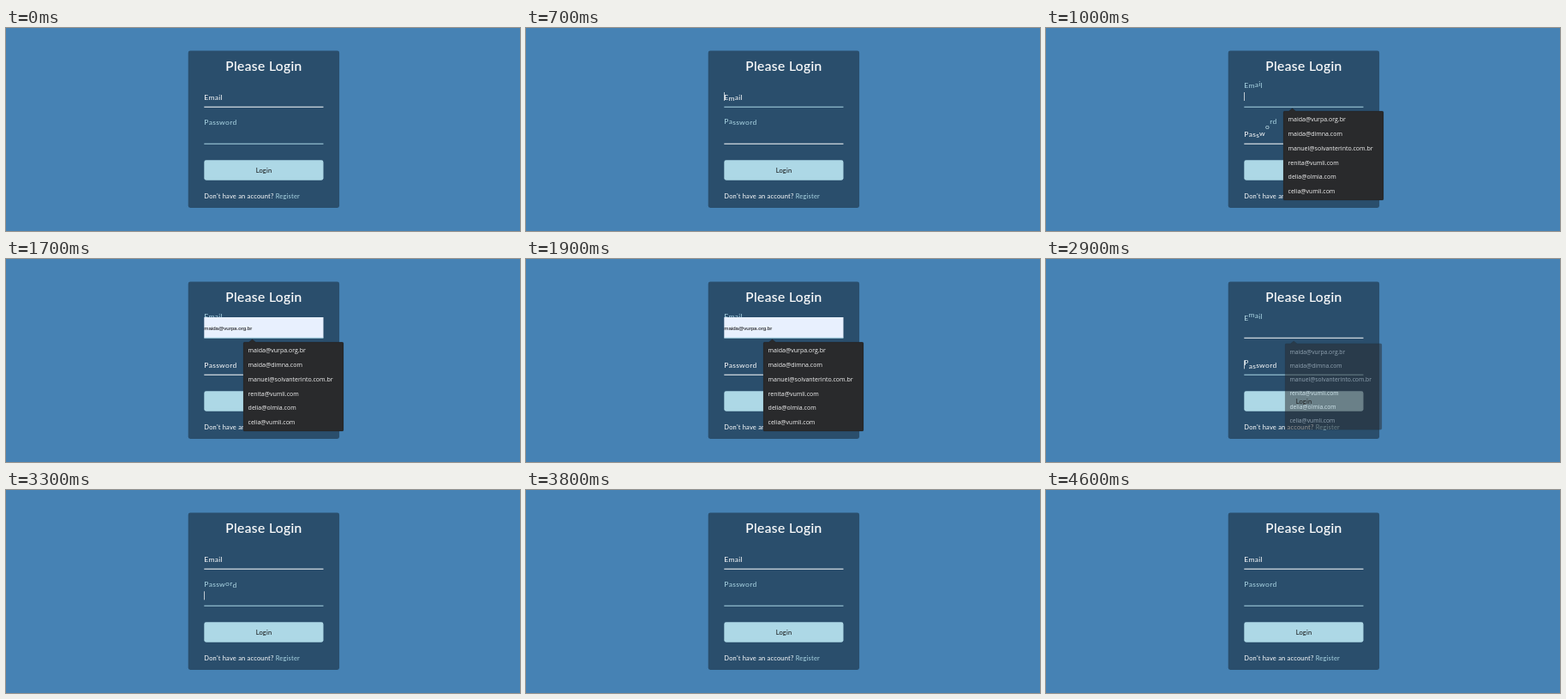
An HTML page for the animation above (5 s loop, 600 by 237 pixels).

```html
<!DOCTYPE html>
<html lang="en">
<head>
<meta charset="utf-8">
<title>Login form</title>
<style>
  html, body { margin: 0; width: 100%; height: 100%; overflow: hidden; background: #4682b4; }
  svg { display: block; width: 600px; height: 237px; font-family: Lato, "Open Sans", sans-serif; }
  text { fill: #fff; white-space: pre; }
  .title { font-size: 15.5px; letter-spacing: .42px; stroke: #fff; stroke-width: .2px; }
  .small { font-size: 7.5px; letter-spacing: .2px; }
  .label { font-size: 8.45px; letter-spacing: .3px; }
  .link { fill: #add8e6; }
  .fill { font: 6.13px "Liberation Sans", Arial, sans-serif; fill: #000; }
  #popup { transform-origin: 335.5px 149px; }
  #popup text { font: 7px "Open Sans", "Noto Sans", sans-serif; fill: #f4f4f4; }
</style>
</head>
<body>
<svg viewBox="0 0 600 237">
  <rect x="212.7" y="26.5" width="176.4" height="183.5" rx="2.4" fill="#000" fill-opacity=".4"/>
  <text class="title" x="301" y="50.3" text-anchor="middle">Please Login</text>

  <text class="label" id="email" x="231.3"></text>
  <text class="label" id="password" x="231.3"></text>
  <g id="preview">
    <rect x="231.3" y="68" width="139.2" height="24" fill="#e8f0fe"/>
    <text class="fill" x="231.3" y="82.5">maida@vurpa.org.br</text>
  </g>
  <rect id="emailLine" x="231.3" y="91.7" width="139.2" height="1"/>
  <rect id="passwordLine" x="231.3" y="134.7" width="139.2" height="1"/>
  <rect id="caret" x="231.3" width=".7" height="10" fill="#fff"/>

  <rect x="231.3" y="154.3" width="139.2" height="23.4" rx="2.4" fill="#add8e6"/>
  <text class="small" x="301" y="169" text-anchor="middle" style="fill:#111">Login</text>
  <text class="small" x="231.3" y="199.2">Don't have an account? <tspan class="link">Register</tspan></text>

  <g id="popup">
    <path d="M278.5 97H283.5L287.5 93.8L291.5 97H392.5Q394 97 394 98.5V199.5Q394 201 392.5 201H278.5Q277 201 277 199.5V98.5Q277 97 278.5 97Z"
          fill="#292a2c" stroke="#000" stroke-opacity=".25" stroke-width=".6"/>
  </g>
</svg>
<script>
const LOOP = 5000, STEP = 100;
const TO_EMAIL = 615, TO_PASSWORD = 2778;   // moments the focus moves
const RISE = 14, WAVE = 50, MOVE = 300;
const CARET_ON = [[400, 1300], [2000, 2500], [2700, 3500], [4000, 4600]];
const ADDRESSES = ["maida@vurpa.org.br", "maida@dimna.com", "manuel@solvanterinto.com.br",
                   "renita@vumli.com", "delia@olmia.com", "celia@vumli.com"];

const $ = id => document.getElementById(id);
const clamp = v => Math.min(1, Math.max(0, v));
const within = (t, a, b) => t >= a && t < b;

function add(parent, tag, text, attrs = {}) {
  const el = document.createElementNS("http://www.w3.org/2000/svg", tag);
  el.textContent = text;
  for (const k in attrs) el.setAttribute(k, attrs[k]);
  return parent.appendChild(el);
}

// cubic-bezier(.68, -.55, .265, 1.55)
function backEase(x) {
  if (x <= 0) return 0;
  if (x >= 1) return 1;
  const curve = (s, a, b) => 3 * (1 - s) ** 2 * s * a + 3 * (1 - s) * s * s * b + s ** 3;
  let lo = 0, hi = 1;
  for (let i = 0; i < 24; i++) {
    const mid = (lo + hi) / 2;
    if (curve(mid, .68, .265) < x) lo = mid; else hi = mid;
  }
  return curve(lo, -.55, 1.55);
}

// How far letter i of the email label is raised; the password label does the reverse.
function emailLift(t, i) {
  const wave = start => backEase((t - start - WAVE * i) / MOVE);
  return t < TO_PASSWORD ? wave(TO_EMAIL) : 1 - wave(TO_PASSWORD);
}

const letters = (id, word) => [...word].map(c => add($(id), "tspan", c));
const email = letters("email", "Email");
const password = letters("password", "Password");
ADDRESSES.forEach((a, i) => add($("popup"), "text", a, { x: 282.6, y: 109.4 + 16.7 * i }));

function place(el, base, lift) {
  const k = clamp(lift), mix = (a, b) => Math.round(a + (b - a) * k);
  el.setAttribute("y", base - RISE * lift);
  el.style.fill = `rgb(${mix(255, 173)},${mix(255, 216)},${mix(255, 230)})`;
}

function popupState(t) {
  if (within(t, 800, 900) || within(t, 2900, 3000)) return [.5, .965];
  return [within(t, 900, 2900) ? 1 : 0, 1];
}

function draw() {
  const t = Math.floor(performance.now() % LOOP / STEP) * STEP;
  const onEmail = within(t, TO_EMAIL, TO_PASSWORD);
  email.forEach((el, i) => place(el, 83.6, emailLift(t, i)));
  password.forEach((el, i) => place(el, 126.8, 1 - emailLift(t, i)));

  $("emailLine").style.fill = onEmail ? "#add8e6" : "#fff";
  $("passwordLine").style.fill = onEmail ? "#fff" : "#add8e6";
  $("preview").style.opacity = within(t, 1700, 2000) ? 1 : 0;
  $("caret").setAttribute("y", onEmail ? 75 : 118.3);
  $("caret").style.opacity = CARET_ON.some(([a, b]) => within(t, a, b)) ? 1 : 0;

  const [opacity, scale] = popupState(t);
  $("popup").style.opacity = opacity;
  $("popup").style.transform = `scale(${scale})`;
  requestAnimationFrame(draw);
}
draw();
</script>
</body>
</html>
```
